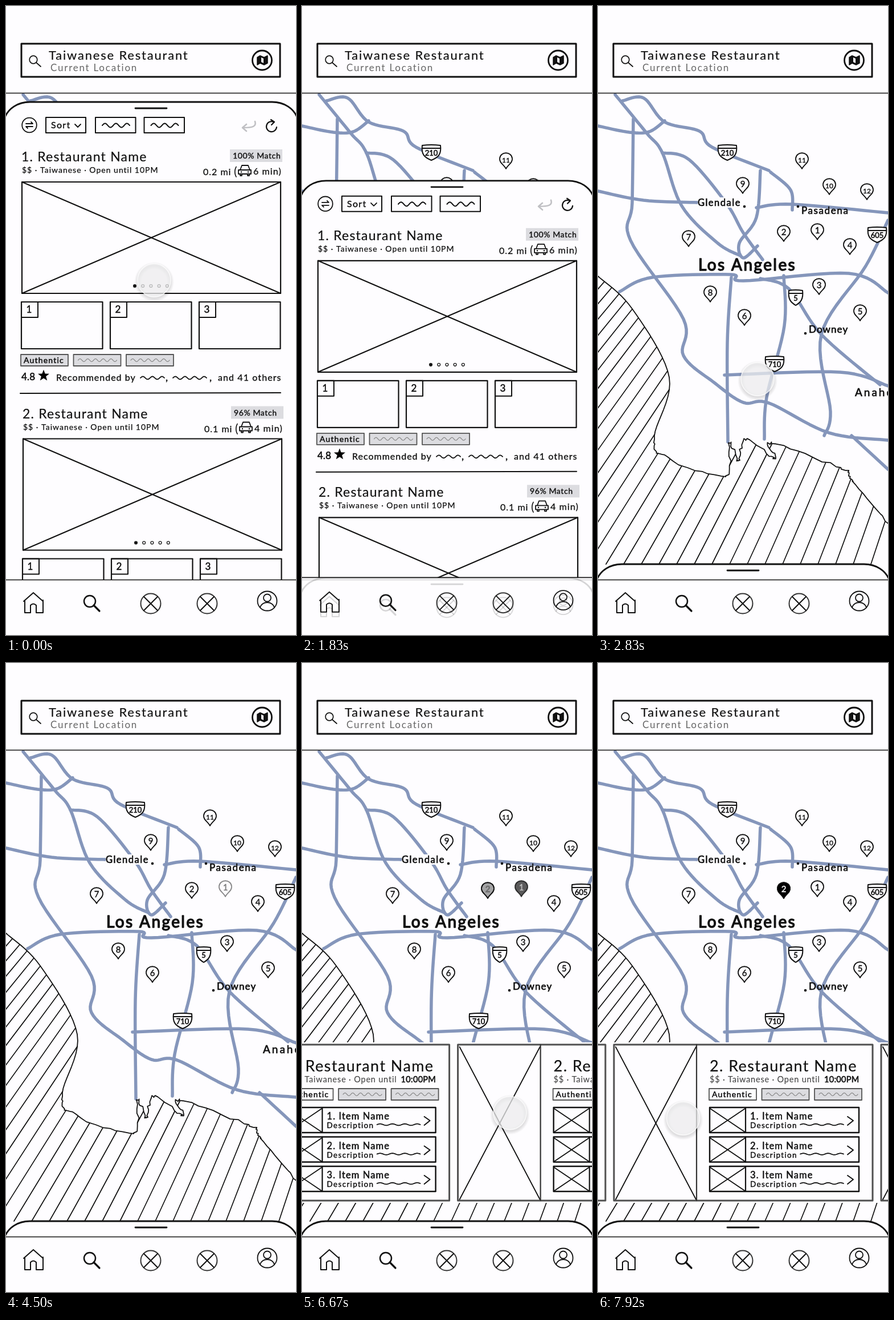
An HTML page with a canvas that plays this animation: 509 px wide and 1101 px high, repeating every 8 s.

```html
<!DOCTYPE html>
<html lang="en">
<head>
<meta charset="utf-8">
<title>Restaurant map wireframe</title>
<style>
html, body { margin: 0; width: 100%; height: 100%; overflow: hidden; background: #fefdff; }
canvas { display: block; width: 100vw; height: 100vh; }
</style>
</head>
<body>
<canvas id="stage"></canvas>
<script>
const W = 509, H = 1101, LOOP = 8000;
const PAPER = '#fefdff', INK = '#111', ROAD = '#8596bb', GREY = '#dcdce0';
const canvas = document.getElementById('stage');
const c = canvas.getContext('2d');

const clamp = v => Math.max(0, Math.min(1, v));
const span = (t, a, b) => clamp((t - a) / (b - a));
const mix = (a, b, p) => a + (b - a) * p;
const easeInOut = p => p < .5 ? 2 * p * p : 1 - 2 * (1 - p) * (1 - p);
const easeOut = (p, n) => 1 - Math.pow(1 - p, n);

// ---------- drawing helpers ----------
function layer(alpha, dx, dy, draw) {
  if (alpha <= 0) return;
  c.save();
  c.globalAlpha *= alpha;
  c.translate(dx, dy);
  draw();
  c.restore();
}

function paint(width, color, fill) {
  if (fill) { c.fillStyle = fill; c.fill(); }
  if (width) { c.lineWidth = width; c.strokeStyle = color || INK; c.stroke(); }
}

function line(x1, y1, x2, y2, width = 2, color = INK) {
  c.beginPath(); c.moveTo(x1, y1); c.lineTo(x2, y2); paint(width, color);
}

function box(x1, y1, x2, y2, width = 2, color = INK, fill) {
  c.beginPath(); c.rect(x1, y1, x2 - x1, y2 - y1); paint(width, color, fill);
}

function ring(x, y, r, width = 2, color = INK, fill) {
  c.beginPath(); c.arc(x, y, r, 0, 7); paint(width, color, fill);
}

function cross(x1, y1, x2, y2, width = 2) {
  line(x1, y1, x2, y2, width);
  line(x1, y2, x2, y1, width);
}

function shape(d, width, color, fill) {
  const p = new Path2D(d);
  if (fill) { c.fillStyle = fill; c.fill(p); }
  if (width) { c.lineWidth = width; c.strokeStyle = color || INK; c.stroke(p); }
}

function write(s, x, y, size, gap, weight, color, align) {
  c.font = size + 'px Lato, sans-serif';
  c.letterSpacing = gap + 'px';
  c.textAlign = align;
  c.fillStyle = c.strokeStyle = color;
  c.lineWidth = weight;
  c.fillText(s, x, y);
  if (weight) c.strokeText(s, x, y);
}

const text = (s, x, y, size, gap = 1, weight = .3, color = INK) =>
  write(s, x, y, size, gap, weight, color, 'left');
const label = (s, x, y, size, weight, color = INK) =>
  write(s, x, y, size, 0, weight, color, 'center');

function wave(x1, x2, y, humps, amp, width = 1.8, color = INK) {
  c.beginPath();
  for (let x = x1; x <= x2; x++) {
    const a = (x - x1) / (x2 - x1) * humps * Math.PI * 2;
    c.lineTo(x, y - Math.sin(a) * amp);
  }
  paint(width, color);
}

function random(seed) {
  return () => (seed = seed * 16807 % 2147483647) / 2147483647;
}

// Smooth curve through a few key points, roughened where rough(y) asks for it.
const points = s => s.split(' ').map(p => p.split(',').map(Number));

function spline(s, rough = () => 0) {
  const pts = points(s), path = new Path2D(), rnd = random(7), steps = 10;
  const at = i => pts[Math.max(0, Math.min(pts.length - 1, i))];
  for (let i = 0; i < pts.length - 1; i++) {
    for (let k = 0; k <= steps; k++) {
      const u = k / steps;
      const [x, y] = [0, 1].map(d => {
        const [a, b, e, f] = [-1, 0, 1, 2].map(j => at(i + j)[d]);
        return b + u / 2 * (e - a + u * (2 * a - 5 * b + 4 * e - f + u * (3 * (b - e) + f - a)));
      });
      const r = rough(y);
      path.lineTo(x + (rnd() - .5) * r, y + (rnd() - .5) * r);
    }
  }
  return path;
}

// ---------- map ----------
const roads = [
  '30,155 85,222 113,257 147,350 210,415 250,437',
  '43,166 80,161 117,203 178,219 200,247 300,288',
  '0,210 55,221 90,220 117,201',
  '0,324 80,340 175,344',
  '113,257 160,269 225,345 255,397 289,444',
  '285,288 278,370 248,415 255,441 280,420',
  '303,291 338,322 341,357',
  '278,353 340,347 509,362',
  '62,198 60,345 57,410 150,548 150,612 205,660 255,694 300,695 405,747 509,760',
  '38,500 95,475 233,470 255,481 440,468 509,502',
  '234,475 227,590 228,763',
  '326,472 327,560 296,685 292,758',
  '285,477 335,495 392,575 495,663',
  '509,375 470,455 392,575 408,710 397,752',
  '222,646 425,641 509,665',
  '445,752 509,811'
].map(s => spline(s));

const shore = spline('0,473 60,530 125,650 99,752 114,787 223,824 231,764 246,796 258,758 309,791 306,765 428,810 447,832 509,905',
  y => y > 755 ? 5 : 0);
const sea = new Path2D(shore);
sea.lineTo(W, H);
sea.lineTo(0, H);

// Position of pin n is entry n - 1.
const pins = points('385,394 326,397 388,490 442,420 460,536 257,544 159,406 197,503 254,313 406,315 358,270 472,324');

function pin(n, solid) {
  const [x, y] = pins[n - 1];
  layer(1, x, y, () => {
    shape('M0 15 C-3 8 -12 5 -11 -3 C-10 -16 10 -16 11 -3 C12 5 3 8 0 15Z',
      1.8, INK, solid ? '#000' : PAPER);
    label(n, 0, 4, n > 9 ? 12 : 15, .4, solid ? '#fff' : INK);
  });
}

function shield(n, x, y) {
  const w = n.length > 1 ? 16 : 12;
  layer(1, x, y, () => {
    shape(`M${-w} -12 Q0 -14 ${w} -12 C${w + 2} 4 ${w - 4} 9 0 14 C${4 - w} 9 ${-w - 2} 4 ${-w} -12Z`, 2, INK, PAPER);
    line(-w, -7, w, -7, 2);
    label(n, 0, 6, 13, .6);
  });
}

function water() {
  c.save();
  c.clip(sea);
  for (let b = -420; b < 700; b += 31) {
    const lean = .62 - b * .0006;
    line(b, 977, b + lean * 500, 477, 1.7);
  }
  c.restore();
  c.lineWidth = 1.8;
  c.strokeStyle = INK;
  c.stroke(shore);
}

function place(name, x, y, size, gap, dotX, dotY) {
  text(name, x, y, size, gap, .7);
  if (dotX) ring(dotX, dotY, 2.3, 0, INK, INK);
}

function map(oneOutline, oneSolid, twoSolid) {
  c.strokeStyle = ROAD;
  c.lineWidth = 5.5;
  roads.forEach(r => c.stroke(r));
  water();
  c.fillStyle = PAPER;
  c.fillRect(175, 335, 76, 18);
  place('Glendale', 175, 350, 16.5, 1.5, 257, 351);
  place('Pasadena', 357, 364, 17, 1.6, 351, 351);
  place('Downey', 370, 572, 17, 1.1, 364, 573);
  place('Anaheim', 451, 683, 19, 3);
  text('Los Angeles', 176, 463, 28, 2.4, 1.4);
  shield('210', 227, 256);
  shield('5', 347, 510);
  shield('605', 490, 400);
  shield('710', 310, 626);
  pins.forEach((_, i) => layer(i ? 1 : oneOutline, 0, 0, () => pin(i + 1)));
  layer(oneSolid, 0, 0, () => pin(1, true));
  layer(twoSolid, 0, 0, () => pin(2, true));
}

// ---------- header and footer ----------
function header() {
  c.fillStyle = PAPER;
  c.fillRect(0, 0, W, 152);
  line(0, 152.5, W, 152.5, 1.6);
  box(27, 66, 481, 124, 3);
  ring(48, 94, 6.8, 1.7);
  line(53, 99, 61, 106, 1.7);
  text('Taiwanese Restaurant', 75, 94, 22, 1.8, .2);
  text('Current Location', 78, 114, 17, 1.75, 0, '#666');
  ring(449.5, 95, 17, 2.8);
  shape('M441 90 L446 87 L453 90 L459 87 V100 L453 103 L446 100 L441 103Z', 1.5, INK, INK);
  shape('M448 90 L452 92 V100 L448 98Z', 0, INK, PAPER);
}

function icons() {
  shape('M31 1042 L48 1027 L65 1042 M33 1040 V1062 H43 V1049 Q48 1044 53 1049 V1062 H65 V1040', 2);
  ring(147, 1042, 10, 2.5);
  line(154, 1049, 164, 1059, 3.2);
  for (const x of [254, 353]) {
    ring(x, 1046, 17.5, 2, '#333');
    cross(x - 12, 1034, x + 12, 1058, 2);
  }
  ring(458.5, 1041.5, 17, 1.8);
  ring(458.5, 1036, 6.5, 1.8);
  shape('M446 1053 C449 1041 468 1041 471 1053', 1.8);
}

// While the sheet drops, the bar fades over into the collapsed view's bar.
function footer(p) {
  const moving = p > 0 && p < 1;
  const lift = moving ? p : 0;
  const top = 1004.5 - 24 * lift;
  c.fillStyle = PAPER;
  c.fillRect(0, top, W, H - top);
  layer(1 - lift * lift, 0, 0, () => {
    line(0, top, W, top, 1.6);
    layer(1, 0, -8 * lift, icons);
  });
  if (!moving) return;
  layer(p, 0, 0, () => {
    sheetEdge(977 + 29 * (1 - p));
    layer(1, 0, 8 * (1 - p), icons);
    line(0, 1004.5, W, 1004.5, 1.6);
  });
}

// ---------- list sheet ----------
function sheetEdge(top) {
  shape(`M-2 ${top + 27} C4 ${top + 12} 20 ${top} 42 ${top} H${W - 42} C${W - 20} ${top} ${W - 4} ${top + 12} ${W + 2} ${top + 27}`, 2.8);
  line(227, top + 11, 282, top + 11, 2.8);
}

function tags(x, y, firstFill) {
  for (let i = 0; i < 3; i++) {
    const left = x + i * 92.5;
    box(left, y, left + 83, y + 20, 1.8, '#555', i ? GREY : firstFill);
    if (i) wave(left + 8, left + 76, y + 10, 5, 2.5, 1.2, '#888');
  }
  text('Authentic', x + 5, y + 15, 14, 1.2, .5);
}

function car(x, y) {
  layer(1, x, y, () => {
    shape('M3 8 L6 0 H17 L20 8 M0 8 H22 V15 H0Z M3 15 V18 H6 V15 M16 15 V18 H19 V15', 1.8);
    for (const eye of [5, 17]) ring(eye, 11.5, 1.2, 0, INK, INK);
  });
}

function star(x, y, r) {
  c.beginPath();
  for (let i = 0; i < 10; i++) {
    const a = i * Math.PI / 5, k = i % 2 ? r * .42 : r;
    c.lineTo(x + Math.sin(a) * k, y - Math.cos(a) * k);
  }
  c.closePath();
  paint(0, INK, '#000');
}

function listing(n, match, miles, minutes) {
  text(`${n}. Restaurant Name`, 27, 272, 23, 1.2, .2);
  text('$$ · Taiwanese · Open until 10PM', 28, 292, 14, 1, .25);
  box(393, 251, 485, 273, 0, INK, GREY);
  text(match + ' Match', 398, 267, 14, .6, .35);
  text(miles + ' mi', 346, 296, 16, 1, .3);
  text('(', 400, 297, 21, 0, 0);
  car(408, 279);
  text(minutes + ' min)', 434, 295, 16, 1.1, .3);
  box(28, 308, 482, 503, 2.2);
  cross(28, 308, 482, 503, 2);
  for (let i = 0; i < 5; i++) ring(226 + i * 14.2, 490, 2.4, 1.4, '#222', i ? null : INK);
  for (let i = 0; i < 3; i++) {
    const x = 27 + i * 156;
    box(x, 518, x + 142.5, 600, 2.2);
    box(x, 518, x + 29, 545, 2);
    label(i + 1, x + 13.5, 537, 17, .5);
  }
  tags(26, 610, GREY);
  text('4.8', 27, 655, 17, .2, .6);
  star(66, 647, 10.5);
  text('Recommended by', 88, 656, 16, 1, .35);
  wave(236, 278, 651, 2.5, 2.5);
  text(',', 280, 656, 18, 0, .5);
  wave(293, 352, 651, 3.5, 2.5);
  text(',', 357, 656, 18, 0, .5);
  text('and 41 others', 372, 656, 16, 1.1, .35);
  line(25, 678, 482, 677, 2);
}

function toolbar() {
  ring(41, 208.5, 12.8, 1.8);
  shape('M35 206 H47 L44 203 M47 211 H35 L38 214', 1.8);
  box(70, 195, 140, 222, 2);
  text('Sort', 79, 214, 16, 1.3, .4);
  shape('M121 207 L126 212 L131 207', 1.8);
  for (const x of [157, 242.5]) {
    box(x, 195, x + 70.5, 222, 2);
    wave(x + 12, x + 60, 209, 2.5, 3.5, 2);
  }
  shape('M437 202 C440 211 433 213 416 213 M422 207 L415 213 L422 219', 2.6, '#c0c0c4');
  shape('M470 203 A9 9 0 1 0 475 212 M465 199 L471 203 L466 208', 2.2);
}

function sheet(p) {
  const top = mix(168, 977, p);
  shape(`M-2 ${top + 27} C4 ${top + 12} 20 ${top} 42 ${top} H${W - 42} C${W - 20} ${top} ${W - 4} ${top + 12} ${W + 2} ${top + 27} V${H} H-2Z`, 0, INK, PAPER);
  sheetEdge(top);
  if (p === 1) return;
  layer(1, 0, top - 168, () => {
    toolbar();
    listing(1, '100%', '0.2', 6);
    layer(1, 2, 449.5, () => listing(2, '96%', '0.1', 4));
  });
}

// ---------- result cards ----------
function card(n) {
  box(28, 668, 482, 941, 3, '#505050', PAPER);
  cross(31, 672, 172, 939, 1.8);
  line(173, 668, 173, 941, 2.2, '#333');
  text(`${n}. Restaurant Name`, 196, 715, 27, 1.4, .2);
  text('$$ · Taiwanese · Open until', 196, 734, 14.5, .8, .1, '#444');
  text('10:00PM', 397, 734, 14.5, .3, .6);
  tags(195, 745, PAPER);
  for (let i = 0; i < 3; i++) layer(1, 0, i * 51.5, () => {
    box(196, 778, 458, 822, 2.4);
    cross(197, 780, 258, 821, 1.8);
    line(259, 778, 259, 822, 2.2);
    text(`${i + 1}. Item Name`, 267, 799, 16.5, 1.1, .5);
    text('Description', 267, 814, 13.5, 1.3, .4);
    wave(355, 431, 808, 3.5, 1.3, 1.8);
    shape('M438 794 L448 801 L438 809', 2);
  });
}

function cards(scroll) {
  const pitch = 469, left = Math.max(0, 26 - scroll);
  c.fillStyle = PAPER;
  c.fillRect(left, 664, W - left, 281);
  for (let i = 0; i < 3; i++) layer(1, i * pitch - scroll, 0, () => card(i + 1));
}

// ---------- touch ----------
function touchAt(t) {
  let x = 260, y = 480;
  const glide = (start, end, toX, toY) => {
    const p = easeInOut(span(t, start, end));
    x = mix(x, toX, p);
    y = mix(y, toY, p);
  };
  glide(580, 1330, 252, 190);
  glide(1500, 1800, 243, 370);
  glide(2000, 2100, 280, 653);
  glide(2830, 3580, 385, 395);
  glide(4600, 4700, 330, 628);
  glide(5620, 6250, 472, 785);
  glide(6500, 6980, 50, 795);
  glide(7330, 7950, 150, 797);
  return [x, y];
}

function touch(t) {
  const away = (out, back) => span(t, out, out + 140) - span(t, back, back + 120);
  const alpha = 1 - away(1600, 2500) - away(4340, 5400);
  layer(alpha, ...touchAt(t), () => {
    const shadow = c.createRadialGradient(0, 3, 22, 0, 3, 35);
    shadow.addColorStop(0, 'rgba(0,0,0,0)');
    shadow.addColorStop(.5, 'rgba(0,0,0,.13)');
    shadow.addColorStop(1, 'rgba(0,0,0,0)');
    ring(0, 3, 35, 0, INK, shadow);
    ring(0, 0, 29, 1.5, 'rgba(255,255,255,.8)', 'rgba(236,236,238,.75)');
  });
}

// ---------- scene ----------
function scene(t) {
  c.fillStyle = PAPER;
  c.fillRect(0, 0, W, H);
  const drop = easeInOut(span(t, 1510, 2610));
  const swipe = span(t, 6500, 7250);
  const swap = easeOut(swipe, 1.7);
  const outline = Math.max(1 - span(t, 4420, 4580), swap);
  const solid = span(t, 4500, 4900) * (1 - swap);

  map(outline, solid, swap);
  layer(span(t, 4540, 5000), 0, 0, () => cards(469 * easeOut(swipe, 2.5)));
  sheet(drop);
  footer(drop);
  header();
  touch(t);
}

function frame(now) {
  const d = window.devicePixelRatio || 1;
  const w = Math.round(innerWidth * d), h = Math.round(innerHeight * d);
  if (canvas.width !== w || canvas.height !== h) { canvas.width = w; canvas.height = h; }
  c.setTransform(w / W, 0, 0, h / H, 0, 0);
  c.lineCap = c.lineJoin = 'round';
  scene(now % LOOP);
  requestAnimationFrame(frame);
}
requestAnimationFrame(frame);
</script>
</body>
</html>
```
